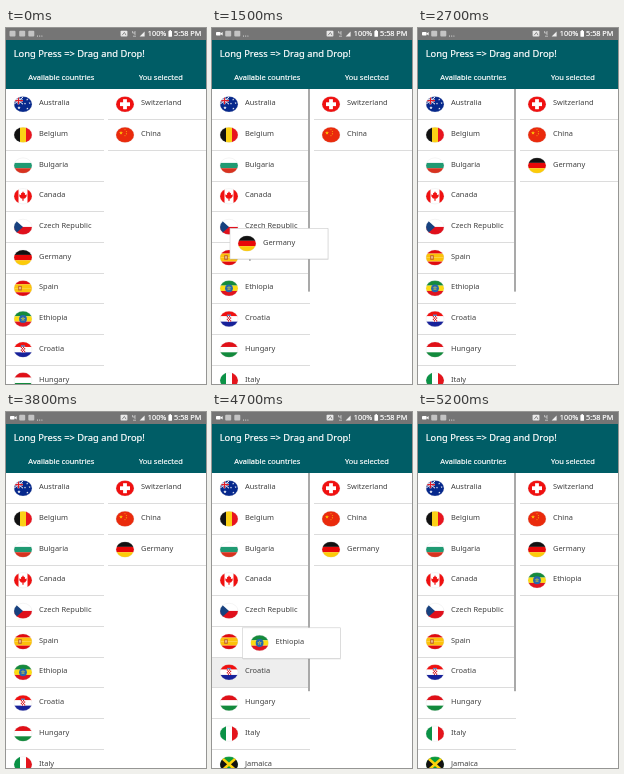
An HTML page that plays this animation: 200 by 356 pixels, repeating every 5700 ms.

```html
<!DOCTYPE html>
<html lang="en">
<head>
<meta charset="utf-8">
<title>Drag and Drop</title>
<style>
  html, body { margin: 0; width: 100%; height: 100%; overflow: hidden; background: #fff; }
  svg { display: block; width: 100%; height: 100%; }
  text { font: 7.45px "Noto Sans", "Open Sans", sans-serif; fill: #fff; }
  .head { stroke: #fff; stroke-width: .2px; }
  .title { font-size: 9.35px; }
  .status { font-size: 7.3px; }
  .row text { fill: #404040; }
</style>
</head>
<body>
<svg id="stage" viewBox="0 0 200 356"></svg>
<script>
const LOOP = 5700, STEP = 100;
const TOP = 61, PITCH = 30.68, COLUMN = 98, RIGHT = 102, VIEW = 295;
const TOTAL = 15;
const COUNTRIES = ['Australia', 'Belgium', 'Bulgaria', 'Canada', 'Czech Republic', 'Germany',
  'Spain', 'Ethiopia', 'Croatia', 'Hungary', 'Italy', 'Jamaica'];

const rect = (x, y, w, h, fill, extra = '') =>
  `<rect x="${x}" y="${y}" width="${w}" height="${h}" fill="${fill}" ${extra}/>`;
const path = (d, fill, extra = '') => `<path d="${d}" fill="${fill}" ${extra}/>`;
const disc = (x, y, r, fill) => `<circle cx="${x}" cy="${y}" r="${r}" fill="${fill}"/>`;
const label = (x, y, s, cls = '') => `<text x="${x}" y="${y}" class="${cls}">${s}</text>`;

// Flags live in a box from (-9,-8) to (9,8).
const across = (...colors) => colors.map((c, i) =>
  rect(-9, -8 + i * 16 / colors.length, 18, 16 / colors.length, c)).join('');
const down = (...colors) => colors.map((c, i) =>
  rect(-9 + i * 18 / colors.length, -8, 18 / colors.length, 16, c)).join('');
const star = (x, y, r, fill) => {
  const points = Array.from({ length: 10 }, (_, i) => {
    const a = i * Math.PI / 5, d = i % 2 ? r * 0.42 : r;
    return `${(x + d * Math.sin(a)).toFixed(2)},${(y - d * Math.cos(a)).toFixed(2)}`;
  });
  return `<polygon points="${points.join(' ')}" fill="${fill}"/>`;
};
const checker = () => {
  let s = rect(-2.2, -3, 4.4, 5.6, '#fff');
  for (let i = 0; i < 16; i++) {
    const col = i % 4, row = i >> 2;
    if ((col + row) % 2 === 0) s += rect(-2.2 + col * 1.1, -3 + row * 1.4, 1.1, 1.4, '#d8141c');
  }
  return s;
};

const FLAGS = {
  Australia: rect(-9, -8, 18, 16, '#06288c') +
    path('M-9-7L0 0M0-7L-9 0', 'none', 'stroke="#fff" stroke-width="1"') +
    path('M-4.5-8V0M-9-3.6H0', 'none', 'stroke="#fff" stroke-width="2"') +
    path('M-4.5-8V0M-9-3.6H0', 'none', 'stroke="#e01c28" stroke-width="1.2"') +
    star(-4, 3.6, 1.8, '#fff') + star(4.2, -4.6, 1.1, '#fff') + star(2, -0.6, 1.1, '#fff') +
    star(6.6, -1.2, 1.1, '#fff') + star(4.4, 4.4, 1.2, '#fff'),
  Belgium: down('#111', '#fbd116', '#e8141e'),
  Bulgaria: across('#fff', '#1f9a72', '#d8321f'),
  Canada: rect(-9, -8, 18, 16, '#fff') + rect(-9, -8, 4.5, 16, '#f01010') + rect(4.5, -8, 4.5, 16, '#f01010') +
    path('M0-5L1.1-3 2-3.4 1.9-.9 3.5-2 3.7 0 2 2.2H.6V4.6H-.6V2.2H-2L-3.7 0-3.5-2-1.9-.9-2-3.4-1.1-3Z', '#f01010'),
  'Czech Republic': across('#fff', '#e0101c') + path('M-9-8L0 0-9 8Z', '#17417f'),
  Germany: across('#111', '#e80808', '#fccb08'),
  Spain: across('#e00a10', '#fcc20a', '#fcc20a', '#e00a10') +
    rect(-4.8, -2.4, 3.6, 4.6, '#c0602a') + rect(-4, -1.4, 2, 2.4, '#e9b98a'),
  Ethiopia: across('#148a3c', '#fcdc12', '#e01420') + disc(0, 0, 3.9, '#2468b0') +
    star(0, 0, 2.5, '#d8cc40') + disc(0, 0, .7, '#2468b0'),
  Croatia: across('#f01010', '#fff', '#17219a') + checker() + rect(-2, -4.4, 4, 1.4, '#5a88c4'),
  Hungary: across('#e01018', '#fff', '#128a3c'),
  Italy: down('#0a9246', '#fff', '#e4141c'),
  Jamaica: rect(-9, -8, 18, 16, '#0a9a3a') + path('M-9-8L0 0-9 8ZM9-8L0 0 9 8Z', '#111') +
    path('M-9-8L9 8M9-8L-9 8', 'none', 'stroke="#fcd20c" stroke-width="2.6"'),
  Switzerland: rect(-9, -8, 18, 16, '#f01010') + rect(-1.9, -5, 3.8, 10, '#fff') + rect(-5, -1.9, 10, 3.8, '#fff'),
  China: rect(-9, -8, 18, 16, '#ea2a0c') + star(-4, -2, 2, '#fcc808') + star(0, -5.2, .8, '#fcc808') +
    star(1.4, -3.4, .8, '#fcc808') + star(1.4, -1, .8, '#fcc808') + star(0, .8, .8, '#fcc808')
};

const item = (name, x, y) => `<g class="row" transform="translate(${x} ${y})">
  <g transform="translate(17 15.2)"><g clip-path="url(#oval)">${FLAGS[name]}</g>
  <ellipse rx="9" ry="7.7" fill="none" stroke="#ccc" stroke-width=".2"/></g>
  ${label(33, 16.4, name)}</g>`;

const column = (names, x) => names.map((name, i) => {
  const y = TOP + i * PITCH;
  return item(name, x, y) + rect(x, Math.floor(y + PITCH), COLUMN, 1, '#dcdcdc');
}).join('');

const card = (name, [x, y]) =>
  rect(x + .4, y + .6, COLUMN, 31, '#000', 'opacity=".1"') +
  rect(x, y, COLUMN, 30.7, '#fff', 'stroke="#ccc" stroke-width=".6"') + item(name, x, y);

function statusBar(t) {
  const square = x => rect(x, 2.8, 6, 5.8, '#c4c4c4', 'rx="1"');
  const camera = rect(4, 3.9, 4.6, 3.6, '#fff', 'rx=".8"') + path('M8.4 5.7L10.6 4V7.4Z', '#fff');
  return rect(0, 0, 200, 12, '#757575') +
    (t < 100 ? square(3.5) : camera) + square(13.2) + square(22.3) +
    [31.5, 33.7, 35.9].map(x => disc(x, 8, .55, '#eee')).join('') +
    rect(114.6, 2.8, 6.8, 5.8, '#e8e8e8', 'rx=".8"') +
    path('M116.2 7.2L118.4 4.4 120 7.2', 'none', 'stroke="#757575" stroke-width=".8"') +
    path('M126.6 3V5H129M129 3V7M127 8.2H130', 'none', 'stroke="#ddd" stroke-width=".7"') +
    path('M138.6 3.4V8.4H133.6Z', '#eee') +
    label(141.8, 8.4, '100%', 'head status') +
    rect(162.4, 2.9, 3.6, 5.8, '#fff', 'rx=".4"') + rect(163.4, 2.1, 1.6, 1, '#fff') +
    label(168, 8.4, '5:58 PM', 'head status');
}

// Each drag: where the card is at given times, and when it is dropped.
const DRAGS = [
  { name: 'Germany', drop: 2500, keys: [[1500, 18, 200.3], [1600, 18.3, 200.3], [1900, 23, 200.4], [2000, 34, 200.6],
    [2100, 48, 200.8], [2200, 63, 201], [2300, 80, 199], [2400, 95, 196]] },
  { name: 'Ethiopia', drop: 5100, keys: [[4600, 30, 217], [4700, 30.6, 215.8], [4800, 47, 212], [4900, 70, 208], [5000, 91, 205]] }
];

function cardPosition(keys, t) {
  const [, x, y] = keys.findLast(k => k[0] <= t);
  return [x, y];
}

function scrollbarOpacity(t) {
  if (t < 1500) return 0;
  if (t < 4600) return Math.max(0, Math.min(1, 1 - (t - 3400) / 400));
  return 1;
}

function pressOpacity(t) {
  if (t < 4200 || t >= 5000) return 0;
  return Math.min(1, (t - 4100) / 300, (5000 - t) / 200);
}

function draw(t) {
  const taken = DRAGS.filter(d => t >= d.keys[0][0]);
  const dropped = taken.filter(d => t >= d.drop);
  const held = taken.find(d => t < d.drop);
  const left = COUNTRIES.filter(name => !taken.some(d => d.name === name));
  const right = ['Switzerland', 'China', ...dropped.map(d => d.name)];
  const barHeight = VIEW * VIEW / ((TOTAL - taken.length) * PITCH);

  return '<defs><clipPath id="oval"><ellipse rx="9" ry="7.7"/></clipPath></defs>' +
    rect(0, 0, 200, 356, '#fff') +
    rect(0, TOP + 6 * PITCH, COLUMN, PITCH, '#eee', `opacity="${pressOpacity(t)}"`) +
    column(left, 0) + column(right, RIGHT) +
    rect(96, TOP, 2, barHeight, '#a9a9a9', `opacity="${scrollbarOpacity(t)}"`) +
    rect(0, 11, 200, TOP - 11, '#005d66') + statusBar(t) +
    label(7.7, 29, 'Long Press =&gt; Drag and Drop!', 'head title') +
    label(22.3, 52.3, 'Available countries', 'head') + label(133, 52.3, 'You selected', 'head') +
    (held ? card(held.name, cardPosition(held.keys, t)) : '');
}

const stage = document.getElementById('stage');
let shown = -1;
function tick() {
  const t = Math.floor(performance.now() % LOOP / STEP) * STEP;
  if (t !== shown) stage.innerHTML = draw(shown = t);
  requestAnimationFrame(tick);
}
tick();
</script>
</body>
</html>
```
